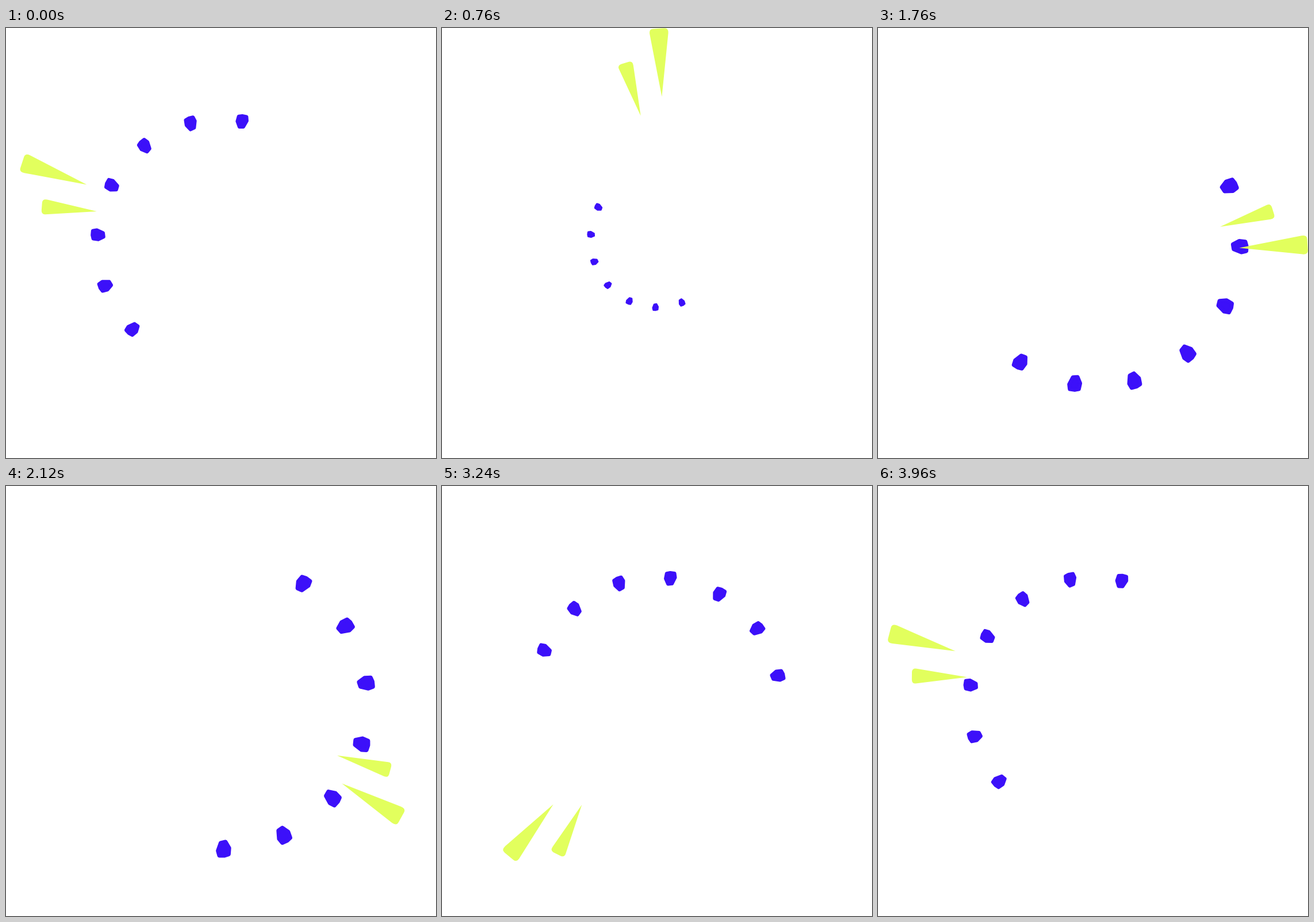
An HTML page for the animation above (4 s loop, 748 by 748 pixels).

```html
<!DOCTYPE html>
<html lang="en">
<head>
<meta charset="utf-8">
<title>Orbiting dots and spikes</title>
<style>
  html, body { margin: 0; width: 100%; height: 100%; overflow: hidden; background: #fff; }
  svg { display: block; width: 100%; height: 100%; }

  .dots, .spikes { animation: spin 4s linear infinite; }
  .dots { animation-direction: reverse; }

  .dot, .spike {
    animation: 4s cubic-bezier(.65, 0, .35, 1) infinite both;
  }
  .dot {
    fill: #3c10f9;
    stroke: #3c10f9;
    stroke-width: 6;
    stroke-linejoin: round;
    rotate: calc(3.65deg - 24deg * var(--i));
    animation-name: breathe;
    animation-delay: calc(40ms * (6 - var(--i)));
  }
  .spike {
    fill: #e2ff5d;
    animation-name: dip;
    animation-delay: var(--delay);
  }

  @keyframes spin { to { rotate: 360deg; } }
  @keyframes breathe {
    0% { scale: 1; }
    17.5% { scale: .52; }
    46.5% { scale: 1.2; }
    64%, 100% { scale: 1; }
  }
  @keyframes dip {
    0% { scale: 1; }
    8% { scale: .51; }
    16%, 100% { scale: 1; }
  }
</style>
</head>
<body>
<svg viewBox="0 0 748 748">
  <defs>
    <path id="pebble" transform="translate(23.2 -213.7)"
      d="M-6.2-8.1 0-9.3 7.5-8.3 8.5-1.1 3.1 9.6-3.9 10.2-8 .7Z"/>
  </defs>
  <g transform="translate(374 374)">
    <g class="dots">
      <use href="#pebble" class="dot" style="--i:0"/>
      <use href="#pebble" class="dot" style="--i:1"/>
      <use href="#pebble" class="dot" style="--i:2"/>
      <use href="#pebble" class="dot" style="--i:3"/>
      <use href="#pebble" class="dot" style="--i:4"/>
      <use href="#pebble" class="dot" style="--i:5"/>
      <use href="#pebble" class="dot" style="--i:6"/>
    </g>
    <g class="spikes" transform="rotate(108)">
      <path class="spike" style="--delay:990ms"
        d="M-24 253.5-41.9 363Q-43 372.3-35.5 372.3H-16Q-8.4 372.3-9.6 363Z"/>
      <path class="spike" style="--delay:1070ms"
        d="M14.7 222.5 22.2 311Q23 318.8 29.5 317.7L43 314.4Q50 312.3 47.5 306Z"/>
    </g>
  </g>
</svg>
</body>
</html>
```
